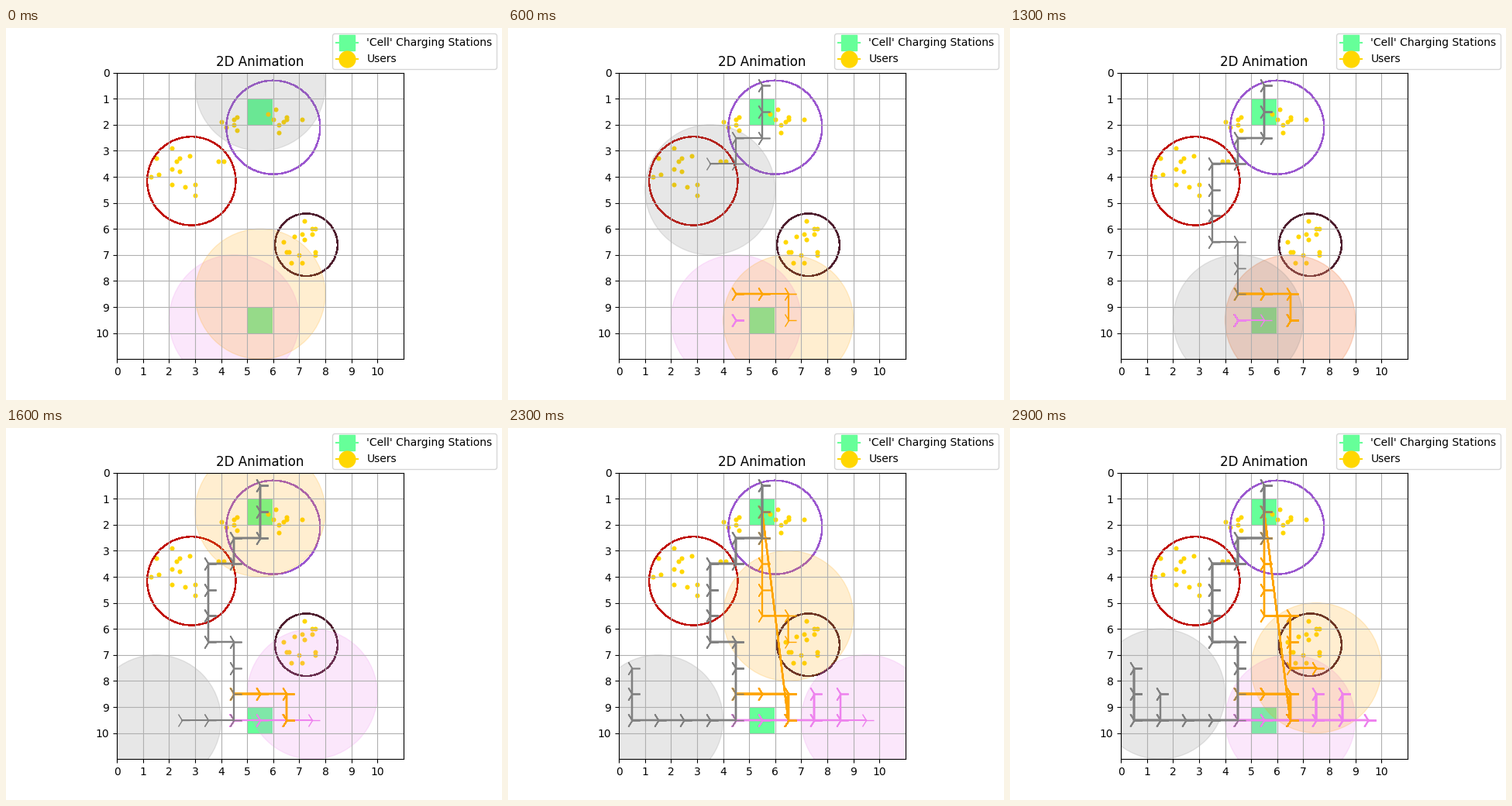
These frames come from a looping animation (640 by 480 pixels, 3000 ms). A matplotlib script:

```python
import numpy as np
import matplotlib.pyplot as plt
from matplotlib.animation import FuncAnimation
from matplotlib.lines import Line2D
from matplotlib.patches import Circle, Rectangle

FRAMES, INTERVAL = 30, 100
GREEN, GOLD = "#66ff99", "gold"
DOCK = (5.5, 1.5)
STEPS = {"U": (0, -1), "D": (0, 1), "L": (-1, 0), "R": (1, 0), ".": (0, 0)}
USERS_PER_GROUP = 15

# colour, start cell, one move per frame ("T" jumps to the dock)
DRONES = [
    ("violet", (4.5, 9.5), "." * 11 + "RR.RUDRU.DR..LLL.."),
    ("orange", (5.5, 8.5), "L.RRD" + "." * 10 + "TDDDDRDUDDR..."),
    ("gray", (5.5, 0.5), "DDLDLDD.DRDDD" + "LLLLUUDDR.U" + "." * 5),
]

# ring centre, ring radius, ring colour, middle and spread of its users
GROUPS = [
    ((6.0, 2.1), 1.8, "#9b57cf", (5.6, 1.9), (1.6, 0.5)),
    ((2.86, 4.16), 1.7, "#c01008", (2.7, 3.8), (1.5, 1.0)),
    ((7.27, 6.61), 1.2, "#4f1f2f", (7.0, 6.5), (0.9, 1.0)),
]


def scatter_users(rng, middle, spread):
    """Random points in an ellipse, rounded to tenths of a cell."""
    angle = rng.uniform(0, 2 * np.pi, USERS_PER_GROUP)
    reach = np.sqrt(rng.uniform(0, 1, USERS_PER_GROUP))
    x = middle[0] + spread[0] * reach * np.cos(angle)
    y = middle[1] + spread[1] * reach * np.sin(angle)
    return x.round(1), y.round(1)


def walk(start, moves):
    """Position of a drone at every frame."""
    path = [start]
    for m in moves:
        x, y = path[-1]
        path.append(DOCK if m == "T" else (x + STEPS[m][0], y + STEPS[m][1]))
    return np.array(path)


fig, ax = plt.subplots(figsize=(6.4, 4.8), dpi=100)
ax.set_aspect("equal")
ax.set_xlim(0, 11)
ax.set_ylim(11, 0)
ax.set_xticks(range(11))
ax.set_yticks(range(11))
ax.grid(True)
ax.set_title("2D Animation")

for corner in [(5, 1), (5, 9)]:
    ax.add_patch(Rectangle(corner, 0.97, 1, facecolor=GREEN, edgecolor="none"))

rng = np.random.default_rng(4)
for centre, radius, colour, middle, spread in GROUPS:
    ax.scatter(*scatter_users(rng, middle, spread), s=19, color=GOLD,
               linewidths=0)
    ax.add_patch(Circle(centre, radius, fill=False, edgecolor=colour,
                        lw=1, antialiased=False))

paths = [walk(start, moves) for _, start, moves in DRONES]
areas = [ax.add_patch(Circle(start, 2.5, color=colour, alpha=0.185))
         for colour, start, _ in DRONES]

# every frame lays one more copy of each trail over the earlier ones
trails = [[ax.plot(*path[:n].T, color=drone[0], marker="4", markersize=15)[0]
           for drone, path in zip(DRONES, paths)]
          for n in range(FRAMES)]

fig.legend(handles=[
    Line2D([0], [0], color=GREEN, marker="s", markersize=15,
           label="'Cell' Charging Stations"),
    Line2D([0], [0], color=GOLD, marker="o", markersize=15, label="Users"),
])


def update(frame):
    for path, area in zip(paths, areas):
        area.center = path[frame]
    for n, layer in enumerate(trails):
        for trail in layer:
            trail.set_visible(n <= frame)
    return areas


anim = FuncAnimation(fig, update, frames=FRAMES, interval=INTERVAL,
                     init_func=lambda: update(0), repeat=True,
                     repeat_delay=0, blit=False)
plt.show()
```
